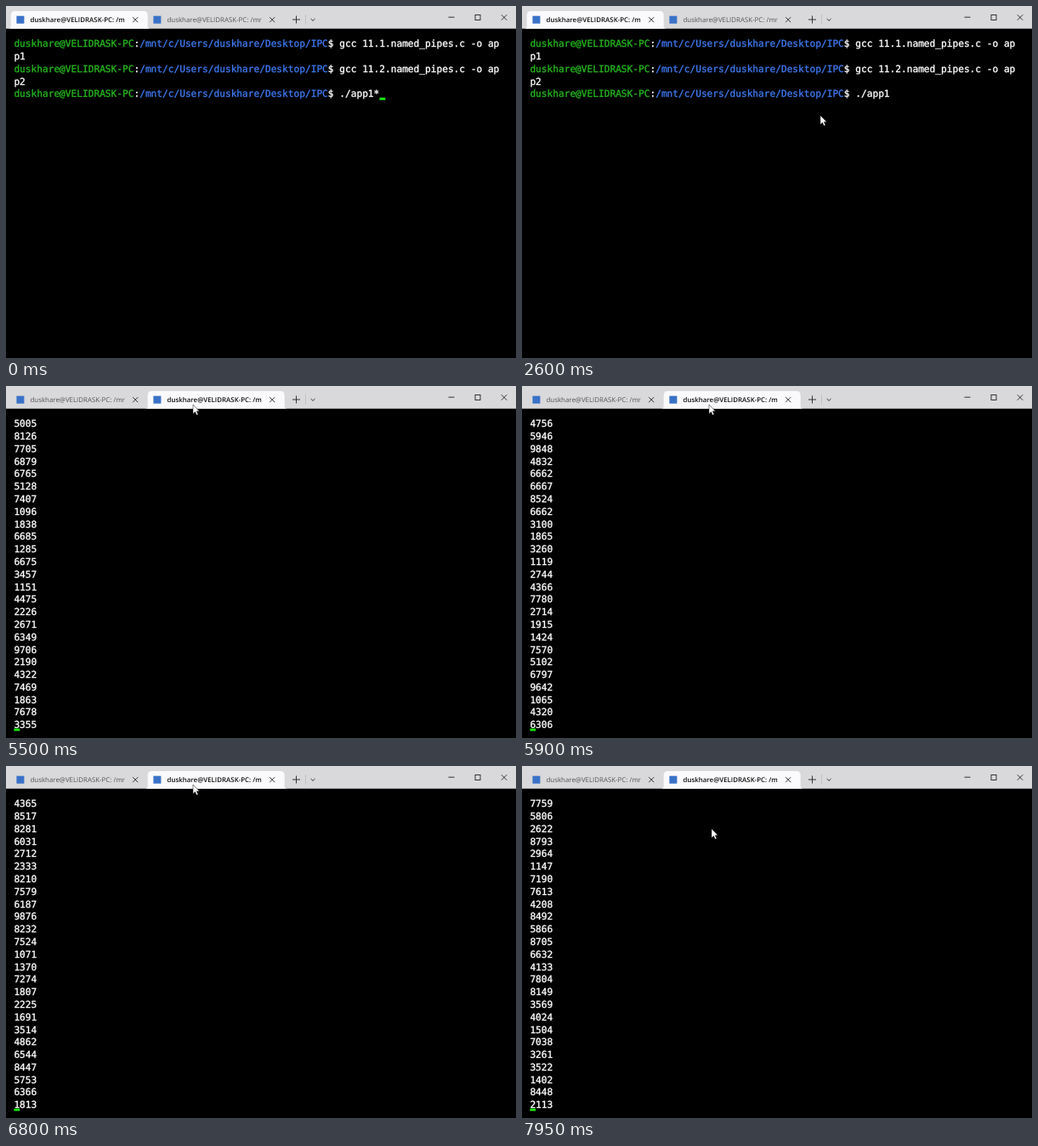
An HTML page that plays this animation: 600x415 px, repeating every 8000 ms.

```html
<!DOCTYPE html>
<html lang="en">
<head>
<meta charset="utf-8">
<title>Terminal</title>
<style>
  html, body { margin: 0; width: 100%; height: 100%; overflow: hidden; background: #000; }
  svg { display: block; width: 100vw; height: 100vh; }
  text { white-space: pre; text-rendering: geometricPrecision; }
  .term { font: 11.16px "DejaVu Sans Mono", monospace; stroke-width: .35; }
  .white { fill: #fff; stroke: #fff; }
  .green { fill: #25b51f; stroke: #25b51f; }
  .blue { fill: #3f78ee; stroke: #3f78ee; }
  .tab { font: 7.9px "Open Sans", "Noto Sans", sans-serif; fill: #555; }
  .tab.active { font-weight: 600; fill: #111; }
  .line { fill: none; stroke: #222; stroke-width: .9; }
</style>
</head>
<body>
<svg id="stage" viewBox="0 0 600 415"></svg>
<script>
const LOOP = 8000, STEP = 50;
const ERASE = 1200, ENTER = 2000, SWITCH = 4150, RUN = 5150;
const X0 = 9.4, COL = 6.72, BASE = 48.3, ROW = 14.79, ROWS = 25;
const BLINK = 530, LINES_PER_STEP = 61;
const USER = 'duskhare', HOST = USER + '@VELIDRASK-PC';

const stage = document.getElementById('stage');

function add(tag, attrs, parent = stage, text) {
  const el = document.createElementNS('http://www.w3.org/2000/svg', tag);
  for (const k in attrs) el.setAttribute(k, attrs[k]);
  if (text !== undefined) el.textContent = text;
  return parent.appendChild(el);
}
const show = (el, on) => el.setAttribute('visibility', on ? 'visible' : 'hidden');
const rowY = r => BASE + r * ROW;
const cross = (x, y, r) => `M${x - r} ${y - r}l${2 * r} ${2 * r}m0 ${-2 * r}l${-2 * r} ${2 * r}`;

// Terminal area
add('rect', { width: 600, height: 415, fill: '#000' });

function termRow(parent, row, text = '') {
  return add('text', { class: 'term white', x: X0, y: rowY(row) }, parent, text);
}
function prompt(parent, row, command) {
  const el = termRow(parent, row);
  add('tspan', { class: 'green' }, el, HOST);
  add('tspan', {}, el, ':');
  add('tspan', { class: 'blue' }, el, `/mnt/c/Users/${USER}/Desktop/IPC`);
  add('tspan', {}, el, '$ ');
  return add('tspan', {}, el, command);
}

const first = add('g', {});
for (const n of [1, 2]) {
  prompt(first, 2 * n - 2, `gcc 11.${n}.named_pipes.c -o ap`);
  termRow(first, 2 * n - 1, 'p' + n);
}
const command = prompt(first, 4, './app1*');

const second = add('g', {});
prompt(second, 0, './app2');

const output = add('g', {});
const rows = Array.from({ length: ROWS }, (_, r) => termRow(output, r));
const caret = add('rect', { width: 6.8, height: 3, fill: '#16e00c' });

// Title bar
add('rect', { width: 600, height: 26.7, fill: '#d9d8da' });

function makeTab(x, id) {
  const shape = add('path', {
    d: `M${x - 3} 26.7q3 0 3-3V11q0-5 5-5h151q5 0 5 5v12.7q0 3 3 3z`
  });
  add('rect', { x: x + 6.7, y: 11.7, width: 9, height: 9, fill: '#3a72c8' });
  const clip = add('clipPath', { id });
  add('rect', { x: x + 22, y: 6, width: 112, height: 20 }, clip);
  const label = add('text', { x: x + 22.8, y: 19, 'clip-path': `url(#${id})` }, stage, HOST + ': /mnt');
  add('path', { class: 'line', d: cross(x + 146.5, 16.2, 3) });
  return { shape, label };
}
const tabs = [makeTab(5.7, 'clipA'), makeTab(166.7, 'clipB')];

function styleTab({ shape, label }, active, hover) {
  shape.setAttribute('fill', active ? '#faf9fb' : hover ? '#cbcacc' : 'none');
  label.setAttribute('class', active ? 'tab active' : 'tab');
}

add('path', { class: 'line', d: 'M337 16h9m-4.5-4.5v9' });
add('path', { d: 'M352.5 10v12', stroke: '#bbb', 'stroke-width': .8 });
add('path', { class: 'line', d: 'M358.7 15l2.4 2.4l2.4-2.4' });
add('path', { class: 'line', d: 'M520.5 13.2h7' });
add('rect', { class: 'line', x: 552, y: 10.5, width: 6, height: 6 });
add('path', { class: 'line', d: cross(586, 13.5, 3.2) });

const pointer = add('path', {
  d: 'M0 0V10.7L2.5 8.4L4.2 12.3L6 11.5L4.3 7.7H7.5Z',
  fill: '#fff', stroke: '#111', 'stroke-width': .5
});

// Pointer moves: start, end, target x, y
const moves = [
  [2300, 2600, 351, 129],
  [2900, 3500, 220, 22],
  [6950, 7200, 224, 62],
  [7450, 7800, 223, 74]
];
function pointerAt(t) {
  let x = 385, y = -14;
  for (const [from, to, tx, ty] of moves) {
    const u = Math.min(1, Math.max(0, (t - from) / (to - from)));
    const e = u * u * (3 - 2 * u);
    x += (tx - x) * e;
    y += (ty - y) * e;
  }
  return [x, y];
}

// Seeded four-digit number on output line n
function value(n) {
  let h = Math.imul(n + 1, 0x9e3779b1);
  h = Math.imul(h ^ (h >>> 15), 0x85ebca6b);
  return 1000 + ((h ^ (h >>> 13)) >>> 0) % 9000;
}

// Caret column, row and the time its blink restarted
function caretAt(t) {
  if (t >= RUN) return [0, ROWS - 1, t];
  if (t >= SWITCH) return [63, 0, 4070];
  if (t >= ENTER) return [0, 5, ENTER];
  if (t >= ERASE) return [63, 4, ERASE];
  return [64, 4, -130];
}

function draw(t) {
  const running = t >= RUN, onSecond = t >= SWITCH;
  show(first, !onSecond);
  show(second, onSecond && !running);
  show(output, running);
  command.textContent = t < ERASE ? './app1*' : './app1';
  if (running) {
    const top = (t - RUN) / STEP * LINES_PER_STEP;
    rows.forEach((row, r) => { row.textContent = value(top + r); });
  }

  const [col, row, since] = caretAt(t);
  caret.setAttribute('x', X0 + col * COL);
  caret.setAttribute('y', rowY(row) + .5);
  show(caret, (t - since) % (2 * BLINK) < BLINK);

  const [x, y] = pointerAt(t);
  pointer.setAttribute('transform', `translate(${x} ${y})`);
  const hover = y > 6 && y < 27 && x > 167 && x < 328;
  styleTab(tabs[0], !onSecond, false);
  styleTab(tabs[1], onSecond, hover);
}

const begin = performance.now();
function tick() {
  const t = (performance.now() - begin) % LOOP;
  draw(Math.floor(t / STEP) * STEP);
  requestAnimationFrame(tick);
}
tick();
</script>
</body>
</html>
```
